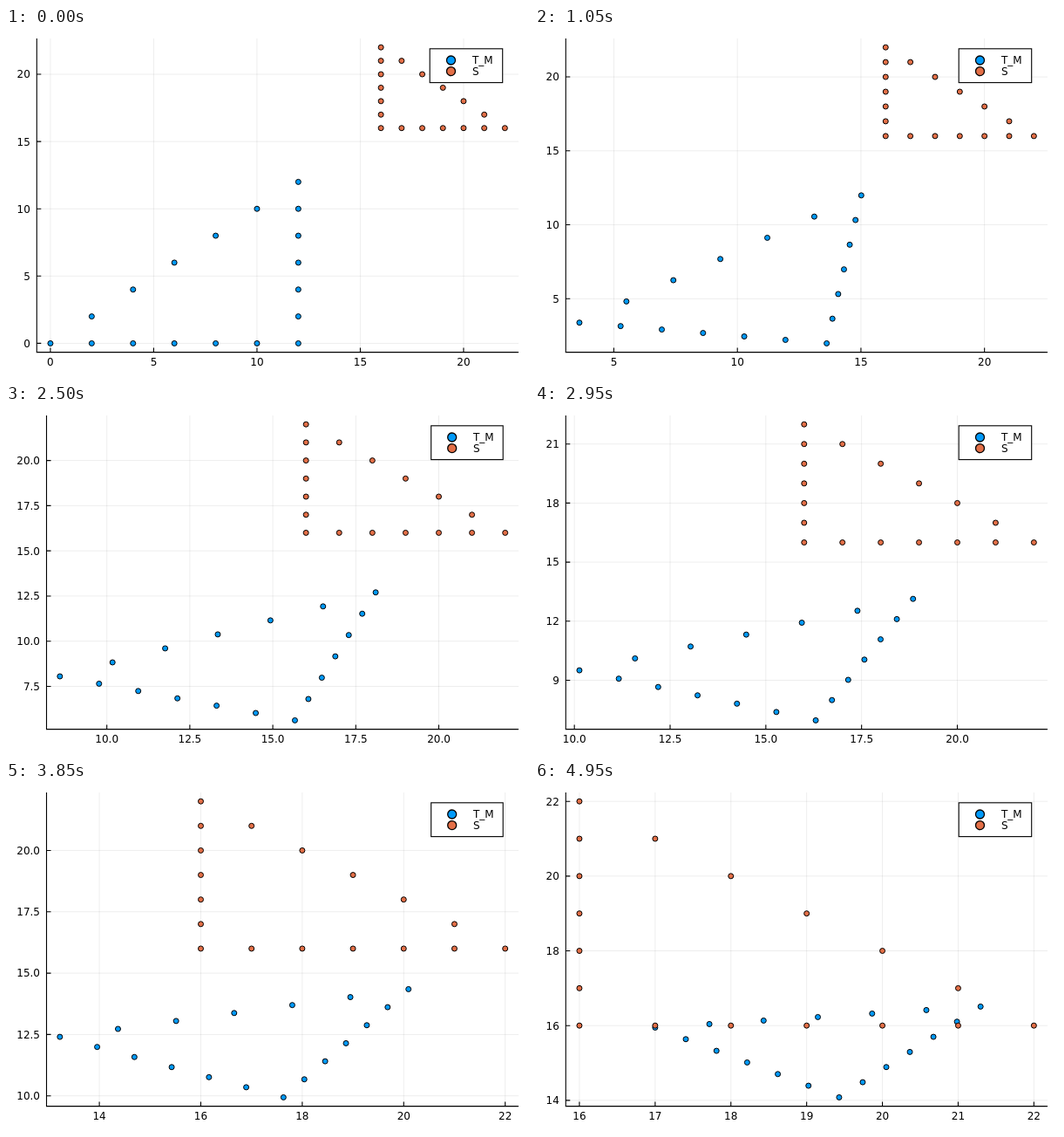
These frames come from a looping animation (600x400 px, 5 s). An HTML page:

```html
<!DOCTYPE html>
<html lang="en">
<head>
<meta charset="utf-8">
<title>Moving triangle</title>
<style>
  html, body { margin: 0; width: 100%; height: 100%; overflow: hidden; background: #fff; }
  svg { display: block; width: 600px; height: 400px; }
  text { font: 12px "DejaVu Sans", sans-serif; fill: #000; }
  .grid { stroke: #000; stroke-opacity: .1; stroke-width: .7; fill: none; }
  .axis { stroke: #000; stroke-width: 1.1; fill: none; }
  .dot { stroke: #000; stroke-width: 1; }
  .key { stroke: #000; stroke-width: 1.3; }
</style>
</head>
<body>
<svg id="plot" viewBox="0 0 600 400" xmlns="http://www.w3.org/2000/svg"></svg>
<script>
const NS = "http://www.w3.org/2000/svg";
const STEP_MS = 50, STEPS = 100;
const RIGHT = 588, TOP = 12, BOTTOM = 371.6, PAD = 0.03, TICK = 5;
const BLUE = "#009afa", ORANGE = "#e36f47";
const svg = document.getElementById("plot");

function add(tag, attrs, parent = svg) {
  const el = document.createElementNS(NS, tag);
  set(el, attrs);
  return parent.appendChild(el);
}

function set(el, attrs) {
  for (const k in attrs) el.setAttribute(k, attrs[k]);
}

// Three-sided outlines made of evenly spaced points
const range = (a, b) => Array.from({ length: b - a + 1 }, (_, i) => a + i);
const moving = [
  ...range(0, 6).map(i => [2 * i, 0]),
  ...range(1, 6).map(i => [12, 2 * i]),
  ...range(1, 5).map(i => [2 * i, 2 * i])
];
const fixed = [
  ...range(16, 22).map(y => [16, y]),
  ...range(17, 22).map(x => [x, 16]),
  ...range(17, 21).map(x => [x, 38 - x])
];

const grid = add("path", { class: "grid" });
const axis = add("path", { class: "axis" });
const labels = add("g", {});
const makeDots = (pts, fill) => pts.map(() => add("circle", { class: "dot", r: 3, fill }));
const blueDots = makeDots(moving, BLUE);
const orangeDots = makeDots(fixed, ORANGE);

const box = add("rect", { class: "axis", y: 23.8, height: 38.8, style: "fill:#fff" });
const keys = [["T_M", BLUE, 37], ["S", ORANGE, 49.6]].map(([name, fill, y]) => {
  const dot = add("circle", { class: "key", r: 5, cy: y, fill });
  const text = add("text", { y: y + 4.4 });
  text.textContent = name;
  return { dot, text };
});

// Shift, shrink and turn, each growing evenly with u
function transform(u) {
  const scale = 1 - 0.7447 * u, turn = -37.55 * Math.PI / 180 * u;
  const c = scale * Math.cos(turn), s = scale * Math.sin(turn);
  return ([x, y]) => [17 * u + c * x - s * y, 15.947 * u + s * x + c * y];
}

function limits(values) {
  const lo = Math.min(...values), hi = Math.max(...values);
  const pad = PAD * (hi - lo);
  return [lo - pad, hi + pad];
}

// Picks the best-scoring round step that gives 4 to 8 ticks
function pickTicks([lo, hi]) {
  const nice = [[1, 1], [5, 0.9], [2, 0.7], [2.5, 0.5], [3, 0.2]];
  let best = { score: -Infinity };
  for (const mag of [10, 1, 0.1]) {
    for (const [q, rank] of nice) {
      const step = q * mag;
      const first = Math.ceil(lo / step), last = Math.floor(hi / step);
      const count = last - first + 1;
      if (count < 4 || count > 8) continue;
      const score = (1 - Math.abs(count - 5) / 5) / 4
        + (first <= 0 ? 1 / 6 : 0)
        + 0.5 * (hi - lo) / ((count - 1) * step)
        + rank / 4;
      if (score > best.score) best = { score, step, first, last };
    }
  }
  const values = range(best.first, best.last).map(i => i * best.step);
  const digits = values.every(Number.isInteger) ? 0 : 1;
  return { values, digits };
}

function label(value, digits, x, y, anchor) {
  add("text", { x, y, "text-anchor": anchor }, labels).textContent = value.toFixed(digits);
}

function place(dots, pts, px, py) {
  pts.forEach(([x, y], i) => set(dots[i], { cx: px(x), cy: py(y) }));
}

function draw(n) {
  const pts = moving.map(transform(n / (STEPS - 1)));
  const all = pts.concat(fixed);
  const xl = limits(all.map(p => p[0])), yl = limits(all.map(p => p[1]));
  const xt = pickTicks(xl), yt = pickTicks(yl);
  const wide = yt.digits > 0;
  const left = wide ? 46.5 : 35.3;
  const px = x => left + (x - xl[0]) / (xl[1] - xl[0]) * (RIGHT - left);
  const py = y => BOTTOM - (y - yl[0]) / (yl[1] - yl[0]) * (BOTTOM - TOP);

  let g = "", a = `M${left} ${TOP}V${BOTTOM}H${RIGHT}`;
  labels.textContent = "";
  for (const v of xt.values) {
    const x = px(v);
    g += `M${x} ${TOP}V${BOTTOM}`;
    a += `M${x} ${BOTTOM}v${-TICK}`;
    label(v, xt.digits, x, 387.4, "middle");
  }
  for (const v of yt.values) {
    const y = py(v);
    g += `M${left} ${y}H${RIGHT}`;
    a += `M${left} ${y}h${TICK}`;
    label(v, yt.digits, left - 7.5, y + 4.4, "end");
  }
  set(grid, { d: g });
  set(axis, { d: a });
  place(blueDots, pts, px, py);
  place(orangeDots, fixed, px, py);

  const boxLeft = wide ? 487.7 : 486.2;
  set(box, { x: boxLeft, width: (wide ? 570.2 : 569.7) - boxLeft });
  for (const k of keys) {
    set(k.dot, { cx: wide ? 511.7 : 510.5 });
    set(k.text, { x: wide ? 536 : 535 });
  }
}

let shown = 0;
const start = performance.now();
function tick() {
  const n = Math.floor((performance.now() - start) / STEP_MS) % STEPS;
  if (n !== shown) draw(shown = n);
  requestAnimationFrame(tick);
}
draw(0);
requestAnimationFrame(tick);
</script>
</body>
</html>
```
